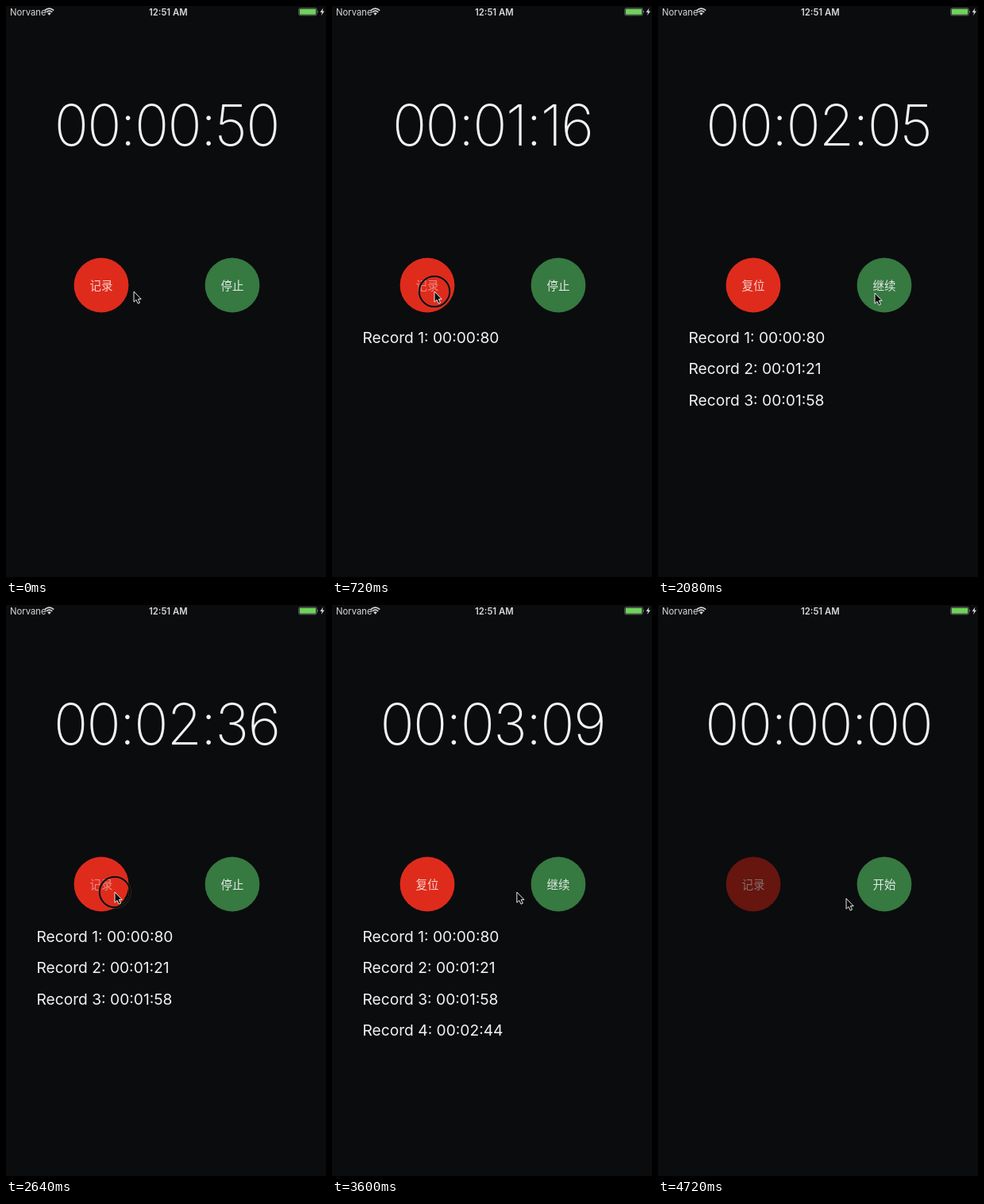
An HTML page for the animation above (4.8 s loop, 403 by 720 pixels).

```html
<!DOCTYPE html>
<html lang="zh">
<head>
<meta charset="utf-8">
<style>
  html, body { margin: 0; width: 100%; height: 100%; overflow: hidden; background: #0b0c0e; }
  svg { display: block; width: 403px; height: 720px; font-family: Inter, sans-serif; fill: #f2f3f3; }
  #clock { font-size: 71.5px; font-weight: 200; letter-spacing: -1.6px; }
  #records { font-size: 19.2px; white-space: pre; }
  .label { font: 14.5px "Noto Sans CJK SC", "Noto Sans CJK", sans-serif; }
  .mid { text-anchor: middle; }
</style>
</head>
<body>
<svg viewBox="0 0 403 720">
  <rect width="403" height="720" fill="#0b0c0e"/>
  <g fill="#d8d9da">
    <text x="5" y="11.6" font-size="11.3">Norvane</text>
    <text class="mid" x="204.3" y="11.8" font-size="11.3" font-weight="600">12:51 AM</text>
    <g fill="none" stroke="#d8d9da" stroke-width="1.7">
      <path d="M48.8 5.6Q54.5 .6 60.2 5.6M50.8 7.8Q54.5 4.6 58.2 7.8"/>
    </g>
    <path d="M52.3 9.2Q54.5 7.5 56.7 9.2L54.5 11.7Z"/>
    <rect x="368.8" y="2.8" width="22.4" height="9" rx="1.6" fill="none" stroke="#7d8380" stroke-width=".8"/>
    <rect x="369.8" y="3.8" width="20.4" height="7" rx=".8" fill="#70d25c"/>
    <path d="M392 5.6q1.6 1.7 0 3.4z" fill="#9da09e"/>
    <path d="M399.4 2.6L395.6 8H398L397 12L401 6.5H398.6Z"/>
  </g>
  <text id="clock" class="mid" x="202.2" y="176"/>
  <circle id="red" cx="120" cy="352" r="34.4"/>
  <circle cx="285" cy="352" r="34.4" fill="#367941"/>
  <text id="left" class="label mid" x="120" y="357.5"/>
  <text id="right" class="label mid" x="285" y="357.5"/>
  <g id="records"></g>
  <g id="pointer">
    <g id="ring" fill="none">
      <circle r="19.2" stroke="#7b4a42" stroke-width="3" opacity=".6"/>
      <circle r="19.2" stroke="#080808" stroke-width="1.8"/>
    </g>
    <path d="M0 0V13.2L3 10.5L5.2 15.2L7.5 14.1L5.4 9.6H9.2Z" fill="#090909" stroke="#e8e8e8" stroke-width="1"/>
  </g>
</svg>
<script>
  const LOOP = 4800, STEP = 80, RATE = 0.0912;
  const STOP = 1706, RESUME = 2307, STOP_AGAIN = 3445, RESET = 4010;
  const $ = id => document.getElementById(id);

  const records = [[330, 80], [775, 121], [1185, 158], [2725, 244]];
  const leftPresses = [[210, 330], [660, 775], [1080, 1185], [2620, 2725], [3900, RESET]];
  const rightPresses = [[1610, STOP], [2210, RESUME], [3350, STOP_AGAIN]];

  // Pointer stops: time, x, y
  const path = [
    [0, 161, 360], [200, 129, 360], [1080, 129, 360], [1200, 137, 362],
    [1600, 273, 362], [2250, 273, 362], [2600, 137, 362], [2760, 137, 362],
    [3200, 250, 361], [3350, 270, 362], [3460, 270, 362], [3860, 138, 362],
    [4240, 138, 362], [4720, 237, 370]
  ];

  const two = n => String(n).padStart(2, "0");
  const format = cs => [cs / 6000, cs / 100 % 60, cs % 100].map(n => two(Math.floor(n))).join(":");
  const pressed = (list, t) => list.some(([from, to]) => t >= from && t < to);

  function elapsed(t) {
    if (t >= RESET) return 0;
    if (t < RESUME) return 50.4 + Math.min(t, STOP) * RATE;
    return 206 + (Math.min(t, STOP_AGAIN) - RESUME) * RATE;
  }

  function pointerAt(t) {
    const next = path.findIndex(p => p[0] > t);
    if (next < 0) return path[path.length - 1].slice(1);
    const [t0, x0, y0] = path[next - 1], [t1, x1, y1] = path[next];
    const u = (t - t0) / (t1 - t0), k = u * u * (3 - 2 * u);
    return [x0 + (x1 - x0) * k, y0 + (y1 - y0) * k];
  }

  const rows = records.map(([, time], i) => {
    const row = document.createElementNS("http://www.w3.org/2000/svg", "text");
    row.setAttribute("x", 38.5);
    row.setAttribute("y", 425 + i * 39.3);
    row.textContent = `Record ${i + 1}:  ${format(time)}`;
    $("records").append(row);
    return row;
  });

  function draw(t) {
    const reset = t >= RESET;
    const paused = t >= STOP && t < RESUME || t >= STOP_AGAIN && t < RESET;
    const onLeft = pressed(leftPresses, t), onRight = pressed(rightPresses, t);

    $("clock").textContent = format(elapsed(t));
    rows.forEach((row, i) => row.style.display = !reset && t >= records[i][0] ? "" : "none");

    $("red").style.fill = reset ? "#66150f" : "#df2b1c";
    $("left").textContent = paused ? "复位" : "记录";
    $("left").style.fill = reset ? "#85716d" : "#fbe4df";
    $("left").style.opacity = reset ? Math.min(1, Math.max(0, (t - 4080) / 240)) : onLeft ? 0.5 : 0.9;
    $("right").textContent = t >= 4160 ? "开始" : paused || reset ? "继续" : "停止";
    $("right").style.opacity = onRight ? 0.4 : reset && t < 4160 ? 0.75 : 0.92;

    $("ring").style.display = onLeft || onRight ? "" : "none";
    $("pointer").setAttribute("transform", `translate(${pointerAt(t)})`);
  }

  function tick() {
    draw(Math.floor(performance.now() % LOOP / STEP) * STEP);
    requestAnimationFrame(tick);
  }
  tick();
</script>
</body>
</html>
```
